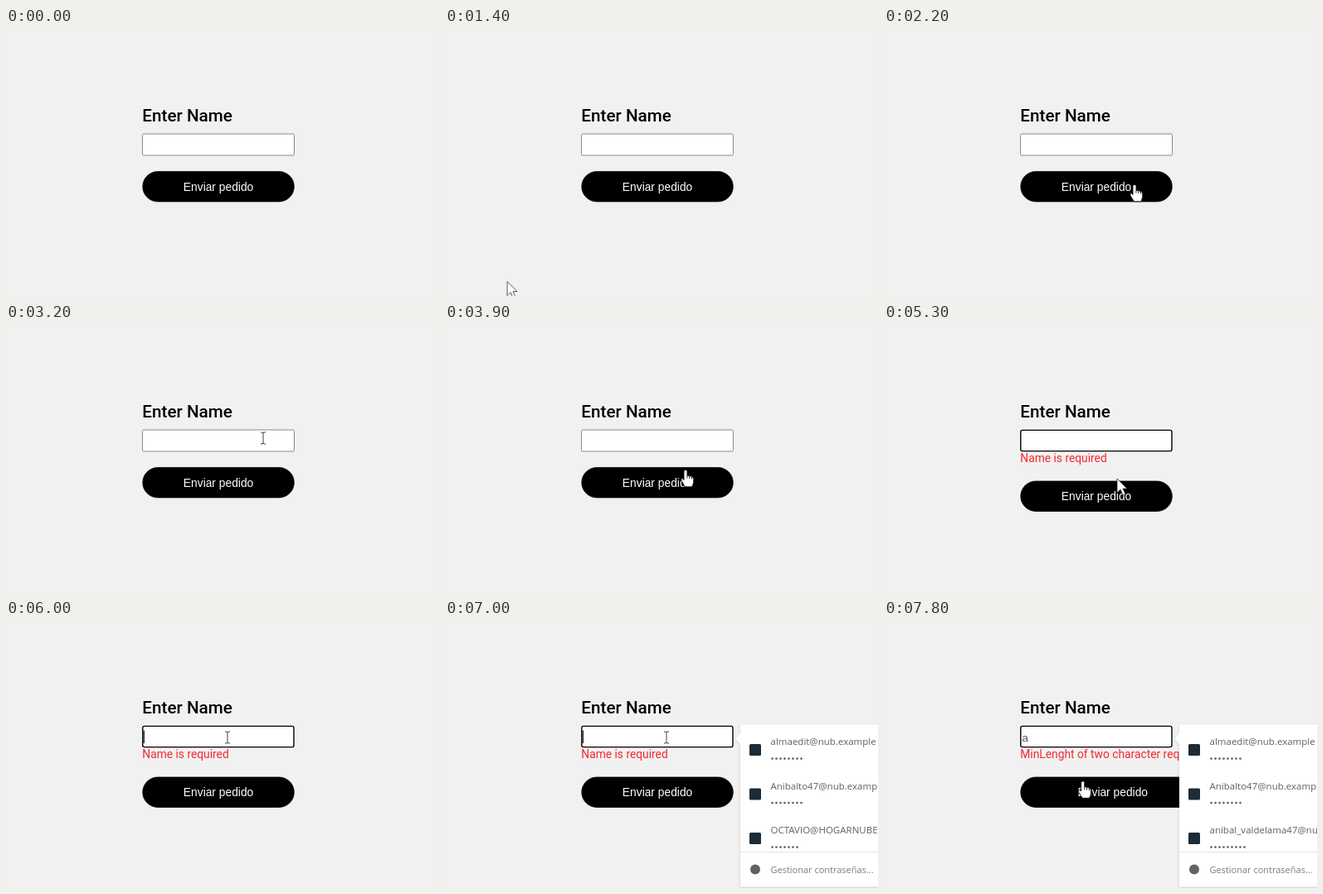
These frames come from a looping animation (522 px wide and 324 px high, 8000 ms). An HTML page:

```html
<!DOCTYPE html>
<html lang="en">
<head>
<meta charset="utf-8">
<title>Name form</title>
<style>
  html, body { margin: 0; width: 100%; height: 100%; overflow: hidden; background: #f1f1f1; }
  svg { display: block; }
  text { white-space: pre; }
  .label { font: 450 20.7px Roboto, sans-serif; }
  .error { font: 13.8px Roboto, sans-serif; fill: #f22a30; }
  .button { font: 13.8px "Liberation Sans", Arial, sans-serif; fill: #fff; text-anchor: middle; }
  .typed { font: 13.4px "Liberation Sans", Arial, sans-serif; fill: #555; }
  .popup { font: 11.5px "Open Sans", sans-serif; fill: #606060; }
  .footer { font-size: 11px; fill: #7c7c7c; }
</style>
</head>
<body>
<svg width="522" height="324" viewBox="0 0 522 324">
  <defs>
    <filter id="shadow" x="-10%" y="-10%" width="120%" height="120%">
      <feDropShadow dx="0" dy="1" stdDeviation="1.5" flood-opacity=".18"/>
    </filter>
  </defs>
  <rect width="522" height="324" fill="#f1f1f1"/>
  <text class="label" x="164.3" y="113">Enter Name</text>
  <rect id="field" fill="#fff"/>
  <text class="typed" id="typed" x="166.6" y="146.5">a</text>
  <path id="caret" d="M166.3 133.5V149" stroke="#222" stroke-width="1.4"/>
  <text class="error" id="error" x="164.3" y="167"></text>
  <rect id="button" x="164.8" height="36.4" rx="18.2" stroke="#000" stroke-width=".8"/>
  <text class="button" id="caption">Enviar pedido</text>

  <g id="popup" class="popup">
    <path d="M356 126.5H540V322.5H356V150L350.5 143.5L356 137Z" fill="#fff" filter="url(#shadow)"/>
    <g id="rows"></g>
    <path d="M356 280.5H522" stroke="#e4e4e4"/>
    <circle cx="374" cy="301.5" r="6" fill="#5f6368"/>
    <text class="footer" x="392.5" y="306">Gestionar contraseñas...</text>
  </g>

  <g id="cursor" stroke-linejoin="round">
    <path id="arrow" d="M0 0V17L4 13L7 20L10 19L7 12H12Z" fill="#fff" stroke="#333" stroke-width=".8"/>
    <g id="hand" stroke="#111" stroke-width=".9">
      <path d="M-2 1.5Q0 -1 2 1.5V7L8 8.5Q9.7 9.5 9.7 11.5V15.5L8 20.8H-.5L-4.8 14Q-5.8 10.5 -4 10.5L-2 12.5Z" fill="#fff"/>
      <path d="M2 7V10.5M4.8 8V11M7.5 8.5V11.5" fill="none"/>
    </g>
    <path id="beam" d="M-3 -7H-1L0 -6L1 -7H3M0 -6V6M-3 7H-1L0 6L1 7H3" fill="none" stroke="#444"/>
  </g>
</svg>
<script>
const LOOP = 8000, STEP = 100;
const FAIL = 4600, OPEN = 6200, TYPE = 7100, APPEAR = 1300;
const $ = id => document.getElementById(id);
const clamp = v => Math.max(0, Math.min(1, v));
const show = (id, on) => $(id).setAttribute('visibility', on ? 'visible' : 'hidden');
const set = (id, attrs) => {
  for (const key in attrs) $(id).setAttribute(key, attrs[key]);
};

// time, x, y of the pointer's hot spot
const path = [
  [1300, 50, 312], [1700, 150, 290], [2100, 296, 222], [2200, 302, 189],
  [2600, 316, 140], [3100, 316, 140], [3300, 304, 136], [3400, 304, 136],
  [3900, 290, 176], [4200, 282, 189], [4900, 282, 189], [5300, 281, 187],
  [5800, 267, 142], [7300, 267, 142], [7800, 239.7, 194.5]
];

function pointer(t) {
  const next = path.findIndex(p => p[0] >= t);
  if (next < 0) return path[path.length - 1].slice(1);
  if (next === 0) return path[0].slice(1);
  const [t0, x0, y0] = path[next - 1], [t1, x1, y1] = path[next];
  const k = (t - t0) / (t1 - t0);
  return [x0 + (x1 - x0) * k, y0 + (y1 - y0) * k];
}

function row(i, name, dots) {
  const y = 151 + i * 53.5;
  let out = `<rect x="367" y="${y - 1}" width="14" height="14" rx="1.5" fill="#1c2b36"/>` +
    `<text x="392.5" y="${y}">${name}</text>`;
  for (let d = 0; d < dots; d++) out += `<circle cx="${394.5 + d * 5}" cy="${y + 16.6}" r="1.3"/>`;
  return out;
}

const firstRows = row(0, 'almaedit@nub.example', 8) + row(1, 'Anibalto47@nub.example', 8);
const allRows = firstRows + row(2, 'OCTAVIO@HOGARNUBE.EXAMPLE', 7);
const filteredRows = firstRows + row(2, 'anibal_valdelama47@nub.example', 9);
let shownRows = '';

function render(t) {
  const failed = t >= FAIL, typed = t >= TYPE;

  set('field', failed
    ? { x: 164.8, y: 128.4, width: 182.2, height: 25.2, rx: 2, stroke: '#000', 'stroke-width': 1.4 }
    : { x: 164.5, y: 128, width: 183, height: 26, rx: 1.5, stroke: '#8a8a8a', 'stroke-width': 1 });
  show('typed', typed);
  const blink = t - (typed ? TYPE : FAIL);
  show('caret', failed && blink % 1000 < 500);
  set('caret', { transform: `translate(${typed ? 8 : 0} 0)` });

  $('error').textContent = typed ? 'MinLenght of two character required' : 'Name is required';
  show('error', failed);

  const top = failed ? 190 : 173.5, width = typed ? 222 : 182.5;
  const hover = clamp((t - 3900) / 300) - clamp((t - FAIL) / 300) + clamp((t - 7800) / 300);
  set('button', { y: top, width, fill: `rgb(${24 * hover},${24 * hover},${26 * hover})` });
  set('caption', { x: 164.8 + width / 2, y: top + 23.2 });

  show('popup', t >= OPEN);
  const rows = typed ? filteredRows : allRows;
  if (rows !== shownRows) $('rows').innerHTML = shownRows = rows;

  const [x, y] = pointer(t);
  const inside = (x0, y0, w, h) => x >= x0 && x <= x0 + w && y >= y0 && y <= y0 + h;
  const kind = inside(164, 128, 184, 26) ? 'beam' : inside(164, top, width, 37) ? 'hand' : 'arrow';
  for (const id of ['arrow', 'hand', 'beam']) show(id, t >= APPEAR && id === kind);
  set('cursor', { transform: `translate(${x} ${y})` });
}

const start = performance.now();
function frame() {
  const t = (performance.now() - start) % LOOP;
  render(Math.floor(t / STEP) * STEP);
  requestAnimationFrame(frame);
}
frame();
</script>
</body>
</html>
```
